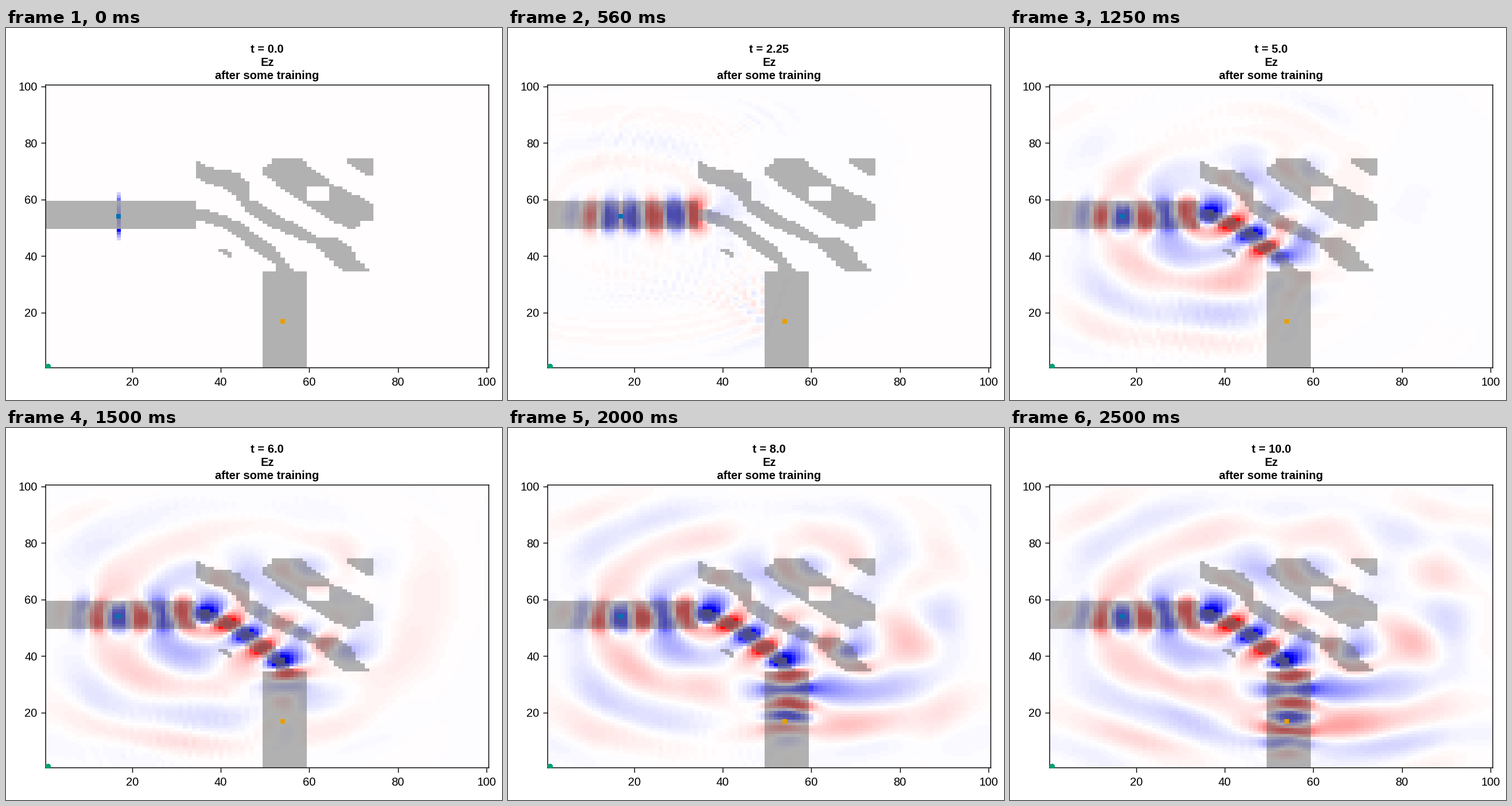
A matplotlib script for the animation above (2560 ms loop, 864 by 648 pixels).

```python
import math

import numpy as np
import matplotlib.pyplot as plt
from matplotlib.animation import FuncAnimation
from matplotlib.path import Path

W, H, DPI = 864, 648, 100
LEFT, RIGHT, TOP, BOTTOM = 69.12, 840.96, 99.36, 591.84
N = 100                       # cells per side
STEPS = 11                    # time steps per shown state
PERIOD = 4 * STEPS            # time steps per wave period
STATES = 41
WAVELENGTH = 32               # vacuum wavelength in cells
COURANT = WAVELENGTH / PERIOD
EPS_CORE, EPS_CLAD = 12.0, 2.08
DRIVE = 3.7
BORDER, BORDER_LOSS = 14, 0.0175
TICKS = range(20, N + 1, 20)
FONT = dict(family="Liberation Sans", size=20.16 * 72 / DPI)

# Key corners of the shaped material, in cell coordinates
SHAPES = dict(
    upper_arm=[(34.5, 73.5), (37, 71.3), (43.5, 69.8), (46.5, 65.5),
               (46.5, 60.3), (62, 46.9), (65.5, 46.6), (69.5, 43.4),
               (70.6, 39.2), (73.6, 34.5), (67.4, 34.5), (61.5, 43.7),
               (51.5, 50.2), (46.5, 54.8), (42, 62.8), (34.5, 67.6)],
    lower_arm=[(34.5, 56.6), (36.6, 56.4), (42.5, 53.3), (45, 51.2),
               (52, 43.2), (56.5, 34.5), (52.5, 34.5), (52.4, 37.6),
               (46, 43.8), (43, 47.8), (38.5, 51.3), (34.5, 52.6)],
    island=[(52.4, 74.6), (57.5, 74.6), (63, 68.8), (65, 65.5), (71.5, 60.8),
            (74.5, 57.5), (74.5, 52.6), (72, 52.3), (70.4, 49.5),
            (68.6, 49.5), (61.5, 56.2), (49.5, 68.6), (49.5, 70.5)],
    corner=[(68.4, 72.8), (68.4, 74.6), (74.5, 74.6), (74.5, 68.5),
            (72.5, 68.5)],
    speck=[(39.5, 42.5), (41.5, 42.5), (42.6, 41), (42.6, 39.5), (41.5, 39.6)],
)


def build_mask():
    x, y = np.meshgrid(np.arange(1, N + 1), np.arange(1, N + 1))
    cells = np.column_stack([x.ravel(), y.ravel()])
    mask = np.zeros(N * N, bool)
    for corners in SHAPES.values():
        mask |= Path(corners + corners[:1]).contains_points(cells)
    mask = mask.reshape(N, N)
    mask[59:64, 59:64] = False        # hole in the island
    mask[49:59, :34] = True           # input guide
    mask[:34, 49:59] = True           # output guide
    return mask


def mode_profile():
    """Fundamental slab mode on a short column around the input port."""
    half = 5.0
    k0 = 2 * math.pi / WAVELENGTH
    v = k0 * half * math.sqrt(EPS_CORE - EPS_CLAD)
    u = 1.0
    for _ in range(60):
        u = 0.5 * (u + math.atan(math.sqrt(v * v - u * u) / u))
    w = math.sqrt(v * v - u * u)
    d = np.abs(np.arange(-8, 9))
    inside = np.cos(u * d / half)
    outside = math.cos(u) * np.exp(-w * (d - half) / half)
    return np.where(d < half, inside, outside)


def damping(pos, eps=1.0):
    """Decay and gain factors; loss ramps up towards the domain border."""
    depth = np.maximum(0, BORDER + 0.5 - np.minimum(pos, N + 1 - pos))
    s = BORDER_LOSS * depth / eps / 2
    return (1 - s) / (1 + s), 1 / (1 + s)


def simulate(mask):
    """Two-dimensional wave solver with absorbing borders."""
    eps = np.where(mask, EPS_CORE, EPS_CLAD)
    gain = COURANT / eps
    cell = np.arange(1, N + 1)
    edge = cell[:-1] + 0.5
    ax_, bx = damping(cell[None, :], eps)
    ay, by = damping(cell[:, None], eps)
    ahx, bhx = damping(edge[None, :])
    ahy, bhy = damping(edge[:, None])
    source = DRIVE * mode_profile() * gain[45:62, 16]
    ex = np.zeros((N, N))
    ey = np.zeros((N, N))
    hy = np.zeros((N, N + 1))
    hx = np.zeros((N + 1, N))
    states = []
    for n in range(STEPS * (STATES - 1) + 1):
        ez = ex + ey
        hy[:, 1:-1] = ahx * hy[:, 1:-1] + bhx * COURANT * np.diff(ez, axis=1)
        hx[1:-1] = ahy * hx[1:-1] - bhy * COURANT * np.diff(ez, axis=0)
        ex = ax_ * ex + bx * gain * np.diff(hy, axis=1)
        ey = ay * ey - by * gain * np.diff(hx, axis=0)
        ex[45:62, 16] -= source * math.cos(2 * math.pi * n / PERIOD)
        if n % STEPS == 0:
            states.append(ex + ey)
    return states


mask = build_mask()
fields = simulate(mask)

fig = plt.figure(figsize=(W / DPI, H / DPI), dpi=DPI, facecolor="white")
ax = fig.add_axes([LEFT / W, 1 - BOTTOM / H,
                   (RIGHT - LEFT) / W, (BOTTOM - TOP) / H])


def pt(px):
    return px * 72 / DPI


def put(x, y, text, **style):
    """Text with its baseline at a pixel position."""
    return fig.text(x / W, 1 - y / H, text, va="baseline", **FONT, **style)


options = dict(origin="lower", extent=(0.5, N + 0.5, 0.5, N + 0.5),
               aspect="auto", interpolation="nearest")
heat = ax.imshow(fields[0], cmap="seismic", vmin=-1, vmax=1, **options)
shade = np.full((N, N, 4), 0.5)
shade[..., 3] = 0.6 * mask
ax.imshow(shade, **options)

for x, y, marker, size, color in ((17, 54, "s", 8, "#0072B2"),
                                  (54, 17, "s", 8, "#E69F00"),
                                  (1, 1, "o", 9.4, "#009E73")):
    ax.plot(x, y, marker, ms=pt(size), mfc=color, mew=0, zorder=3)

ax.set_xlim(0.5, N + 0.5)
ax.set_ylim(0.5, N + 0.5)
ax.set_xticks(TICKS, [""] * len(TICKS))
ax.set_yticks(TICKS, [""] * len(TICKS))
ax.tick_params(length=pt(8), width=pt(1.44))
for spine in ax.spines.values():
    spine.set_linewidth(pt(1.44))
    spine.set_snap(False)

for tick in TICKS:
    part = (tick - 0.5) / N
    put(LEFT + part * (RIGHT - LEFT), 623, str(tick), ha="center")
    put(54.5, BOTTOM - part * (BOTTOM - TOP) + 7.2, str(tick), ha="right")

mid = (LEFT + RIGHT) / 2
clock, *_ = [put(mid, 42.6 + 23.4 * row, line, ha="center", weight="bold")
             for row, line in enumerate(("", "Ez", "after some training"))]


def update(i):
    # States change every 62.5 ms, rounded to 10 ms
    k = min(STATES - 1, math.ceil((2 * i + 1.5) / 6.25) - 1)
    heat.set_data(fields[k])
    clock.set_text(f"t = {k / 4}")
    return heat, clock


anim = FuncAnimation(fig, update, frames=128, interval=20, repeat=True,
                     repeat_delay=0, blit=False)
plt.show()
```
